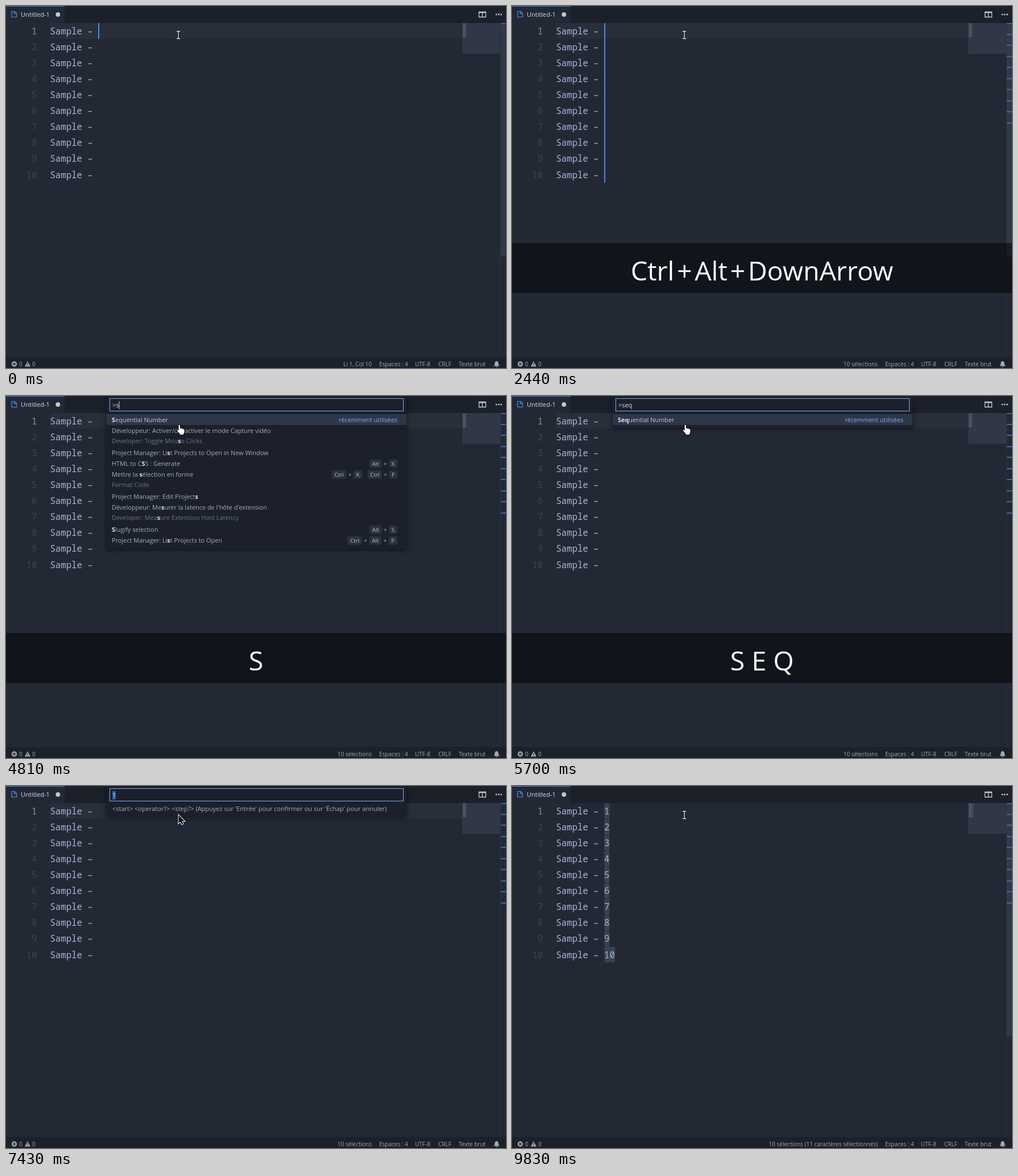
Recreate the animation shown at these times as an HTML page with a canvas. Size 879 by 637 pixels, loop 9.92 s.

```html
<!DOCTYPE html>
<html lang="fr">
<head>
<meta charset="utf-8">
<title>Multi-cursor numbering</title>
<style>
html, body { margin: 0; height: 100%; overflow: hidden; background: #222935; }
canvas { display: block; }
</style>
</head>
<body>
<canvas id="stage" width="879" height="637"></canvas>
<script>
const ctx = document.getElementById('stage').getContext('2d');
const LOOP = 9920, W = 879, H = 637;
const UI = '"Open Sans", "Noto Sans", sans-serif';
const MONO = '15.7px "Noto Sans Mono", "DejaVu Sans Mono", monospace';
const BG = '#222935', DARK = '#1b202a', BLUE = '#4d88ee', PALE_BLUE = '#82aaff', SLIDER = '#303746';
const TEXT = '#a6adbb', DIM = '#6c7482', BRIGHT = '#d5dae5';
const CHAR = 9.42, LINE = 28.1, LEFT = 77.4, TOP = 30;

// Each entry changes part of the state from its time on.
const steps = [
  [0, { cursors: 1, on: true, keys: '', view: 'edit', query: '', caret: true }],
  [410, { keys: 'Ctrl' }],
  [640, { keys: 'Ctrl+Alt' }],
  [870, { keys: 'Ctrl+Alt+DownArrow', cursors: 2 }],
  [1100, { cursors: 3 }],
  [1320, { cursors: 4 }],
  [1560, { cursors: 5 }],
  [1780, { cursors: 6 }],
  [2000, { cursors: 8 }],
  [2220, { cursors: 9 }],
  [2440, { cursors: 10 }],
  [3090, { keys: 'Ctrl', on: false }],
  [3300, { keys: 'Ctrl+Maj' }],
  [3500, { keys: 'Ctrl+Maj+P', view: 'list' }],
  [3940, { caret: false }],
  [4160, { keys: '' }],
  [4600, { caret: true }],
  [4810, { keys: 'S', query: 's' }],
  [5040, { keys: 'S E', query: 'se' }],
  [5240, { keys: 'S E Q', query: 'seq' }],
  [5700, { caret: false }],
  [5920, { keys: '' }],
  [6140, { caret: true }],
  [6550, { keys: 'Enter', view: 'prompt' }],
  [7430, { keys: '' }],
  [8290, { keys: 'Enter', view: 'done', on: true }],
  [8760, { on: false }],
  [8970, { keys: '' }],
  [9160, { on: true }],
  [9830, { on: false }]
];

const commands = [
  { label: 'Sequential Number' },
  { label: 'Développeur: Activer/désactiver le mode Capture vidéo', alias: 'Developer: Toggle Mouse Clicks' },
  { label: 'Développeur: Recharger la fenêtre', alias: 'Developer: Reload Window', keys: 'Ctrl+R' },
  { label: 'Project Manager: List Projects to Open in New Window' },
  { label: 'HTML to CSS : Generate', keys: 'Alt+X' },
  { label: 'Mettre la sélection en forme', alias: 'Format Code', keys: 'Ctrl+K Ctrl+F' },
  { label: 'Project Manager: Edit Projects' },
  { label: "Développeur: Mesurer la latence de l'hôte d'extension", alias: 'Developer: Measure Extension Host Latency' },
  { label: 'Slugify selection', keys: 'Alt+S' },
  { label: 'Project Manager: List Projects to Open', keys: 'Ctrl+Alt+P' }
];

function rect(x, y, w, h, color) {
  ctx.fillStyle = color;
  ctx.fillRect(x, y, w, h);
}

function rounded(x, y, w, h, r, color) {
  ctx.fillStyle = color;
  ctx.beginPath();
  ctx.roundRect(x, y, w, h, r);
  ctx.fill();
}

function dot(x, y, r, color) {
  ctx.fillStyle = color;
  ctx.beginPath();
  ctx.arc(x, y, r, 0, 7);
  ctx.fill();
}

function text(str, x, y, color, font, align = 'left') {
  ctx.font = typeof font === 'number' ? `${font}px ${UI}` : font;
  ctx.textAlign = align;
  ctx.fillStyle = color;
  ctx.fillText(str, x, y);
  return ctx.measureText(str).width;
}

function shape(x, y, d, fill, stroke, width = 1) {
  const path = new Path2D(d);
  ctx.save();
  ctx.translate(x, y);
  ctx.lineWidth = width;
  if (stroke) { ctx.strokeStyle = stroke; ctx.stroke(path); }
  if (fill) { ctx.fillStyle = fill; ctx.fill(path); }
  ctx.restore();
}

function tabBar() {
  rect(0, 0, W, TOP, DARK);
  rect(0, 0, 103, TOP, BG);
  rect(0, 0, 103, 1, '#4a86d8');
  shape(9, 9, 'M1 .5H6L9.5 4V10.5H1ZM5.5 .5V4.5H9.5', null, '#4a90e8', 1.2);
  text('Untitled-1', 26, 19, BRIGHT, 11);
  dot(91.3, 15, 3.9, '#c3c7ce');
  shape(831, 10, 'M.5 .5H12.5V9.5H.5ZM6.5 0V10M0 1.5H13', null, '#c5c9d0', 1.3);
  for (let i = 0; i < 3; i++) dot(862 + i * 4.3, 15, 1.4, '#c5c9d0');
}

function editor(s) {
  const done = s.view === 'done';
  const focused = done || s.view === 'edit';
  if (!done) rect(77, TOP, 792, 27.5, '#282f3b');
  for (let i = 0; i < 10; i++) {
    const y = TOP + i * LINE, base = Math.round(y + 19.6), number = String(i + 1);
    const start = LEFT + 9 * CHAR, end = start + (done ? number.length * CHAR : 0);
    if (done) rounded(start, y, end - start, LINE - .5, 3, '#374252');
    text(number, 54.5, base, i ? '#3c4455' : '#868fa3', MONO, 'right');
    text('Sample – ' + (done ? number : ''), LEFT, base, '#a7b5d4', MONO);
    if (focused && s.on && i < s.cursors) rect(Math.round(end - .4), y, 2, LINE, BLUE);
  }
  rect(802, TOP, 67, 54, SLIDER);
  for (let i = 0; i < 10; i++) {
    const y = TOP + 1 + i * 2.5;
    rect(803, y, 5, 1.2, '#697184');
    rect(808.5, y, done ? 3 : 1, 1.2, '#596174');
  }
  rect(869, TOP, 1, 588, '#2b3240');
  for (let i = 0; i < s.cursors; i++) rect(870, Math.floor(TOP + i * 19.45), 9, 2, '#3c69b8');
  if (focused) rect(870, TOP, 9, 411, 'rgba(85,97,120,.28)');
}

function statusBar(s) {
  const y = 633.5, c = '#a2a9b7';
  rect(0, 618, W, H - 618, DARK);
  dot(14.5, 630, 4.7, c);
  shape(14.5, 630, 'M-2 -2L2 2M2 -2L-2 2', null, DARK, 1.4);
  text('0', 23, y, c, 10);
  shape(33, 625, 'M5 0L10 9.5H0Z', c);
  shape(38, 628, 'M0 0V3.2M0 4.3V5.5', null, DARK, 1.2);
  text('0', 46, y, c, 10);
  const chosen = s.cursors === 1 ? 'Li 1, Col 10'
    : `${s.cursors} sélections` + (s.view === 'done' ? ' (11 caractères sélectionnés)' : '');
  text(chosen, 643, y, c, 10, 'right');
  text('Espaces : 4', 656, y, c, 10);
  text('UTF-8', 719, y, c, 10);
  text('CRLF', 760, y, c, 10);
  text('Texte brut', 796, y, c, 10);
  shape(857, 625, 'M5.5 0C3 0 2.4 2 2.3 4C2.2 6 1.5 7 0 8.4H11C9.5 7 8.8 6 8.7 4C8.6 2 8 0 5.5 0ZM4 9H7Q6.5 10.5 5.5 10.5T4 9Z', c);
}

function panel(height) {
  ctx.save();
  ctx.shadowColor = 'rgba(0,0,0,.55)';
  ctx.shadowBlur = 8;
  ctx.shadowOffsetY = 2;
  rect(177, 0, 527, height, DARK);
  ctx.restore();
  ctx.strokeStyle = PALE_BLUE;
  ctx.lineWidth = 1;
  ctx.strokeRect(182.5, 4.5, 516, 22);
}

// Draws a label with its first match of the query in bold.
function matched(str, query, x, y, color) {
  const at = query ? str.toLowerCase().indexOf(query) : -1;
  if (at < 0) return text(str, x, y, color, 10.9);
  const end = at + query.length;
  x += text(str.slice(0, at), x, y, color, 10.9);
  x += text(str.slice(at, end), x, y, '#dfe3ea', `bold 10.9px ${UI}`);
  text(str.slice(end), x, y, color, 10.9);
}

function shortcut(keys, y) {
  let x = 688;
  for (const chord of keys.split(' ').reverse()) {
    chord.split('+').reverse().forEach((key, i) => {
      if (i) {
        text('+', x - 6.3, y + 3.8, TEXT, 10, 'center');
        x -= 12.5;
      }
      ctx.font = `9.8px ${UI}`;
      const w = ctx.measureText(key).width + 9.5;
      x -= w;
      rounded(x, y - 7.5, w, 15, 3, '#2c323d');
      text(key, x + w / 2, y + 3.6, '#bdc3ce', 9.8, 'center');
    });
    x -= 9;
  }
}

function commandList(s) {
  const has = str => str && str.toLowerCase().includes(s.query);
  const rows = [];
  let bottom = 32;
  for (const cmd of commands.filter(c => has(c.label) || has(c.alias))) {
    const h = cmd.alias ? 38.66 : 19.33;
    if (bottom + h > 266) break;
    rows.push([cmd, bottom]);
    bottom += h;
  }
  panel(bottom + 5);
  const w = text('>' + s.query, 187, 20, BRIGHT, 10.9);
  if (s.caret) rect(187 + w, 9, 1, 14, BRIGHT);
  rect(177, 32, 527, 19, '#2d3748');
  if (!s.query) rect(695, 32, 9, 18, '#424b5c');
  rows.forEach(([cmd, top], i) => {
    matched(cmd.label, s.query, 186, top + 13.7, i ? TEXT : '#c3c9d5');
    if (cmd.alias) matched(cmd.alias, s.query, 186, top + 31.2, DIM);
    if (cmd.keys) shortcut(cmd.keys, top + 9.7);
  });
  text('récemment utilisées', 688, 45.7, PALE_BLUE, 10.9, 'right');
}

function prompt() {
  panel(54);
  rect(187, 9, 6, 15, '#2e5aa8');
  text('1', 187, 20, BRIGHT, 10.9);
  text("<start> <operator?> <step?> (Appuyez sur 'Entrée' pour confirmer ou sur 'Échap' pour annuler)",
    187, 44, TEXT, 11);
}

function pointer(view) {
  if (view === 'list') {
    shape(300, 50, 'M3 1.5Q5 0 6 2V7Q8 5.8 8.7 7.5Q10.6 6.6 11.2 8.2Q13.5 7.7 13.5 10V13Q13.3 15 12 16.5V18H5.5V16.5L1 11.5Q0 9.5 1.5 9.2L3.5 11V2Z', '#fff', '#000', 2);
  } else if (view === 'prompt') {
    shape(303, 51, 'M.5 .5V14.5L3.7 11.5L6 16.5L8.3 15.5L6 10.7H10.5Z', '#000', '#fff', 2);
  } else {
    const beam = 'M-3 -6.5H-1Q0 -6.5 0 -5.5Q0 -6.5 1 -6.5H3M0 -5.5V5.5M-3 6.5H-1Q0 6.5 0 5.5Q0 6.5 1 6.5H3';
    shape(303, 51, beam, null, '#000', 3);
    shape(303, 51, beam, null, '#fff', 1.3);
  }
}

function keyBanner(keys) {
  if (!keys) return;
  rect(0, 417, W, 88, 'rgba(0,0,0,.5)');
  const spaced = keys.replaceAll('+', '\u200a+\u200a');
  text(spaced, W / 2, 482.5, '#fff', `500 46.5px ${UI}`, 'center');
}

function draw(now) {
  const t = now % LOOP;
  const s = Object.assign({}, ...steps.filter(([at]) => at <= t).map(([, change]) => change));
  rect(0, 0, W, H, BG);
  editor(s);
  tabBar();
  statusBar(s);
  if (s.view === 'list') commandList(s);
  if (s.view === 'prompt') prompt();
  pointer(s.view);
  keyBanner(s.keys);
}

const begin = performance.now();
function tick() {
  draw(performance.now() - begin);
  requestAnimationFrame(tick);
}
tick();
</script>
</body>
</html>
```
